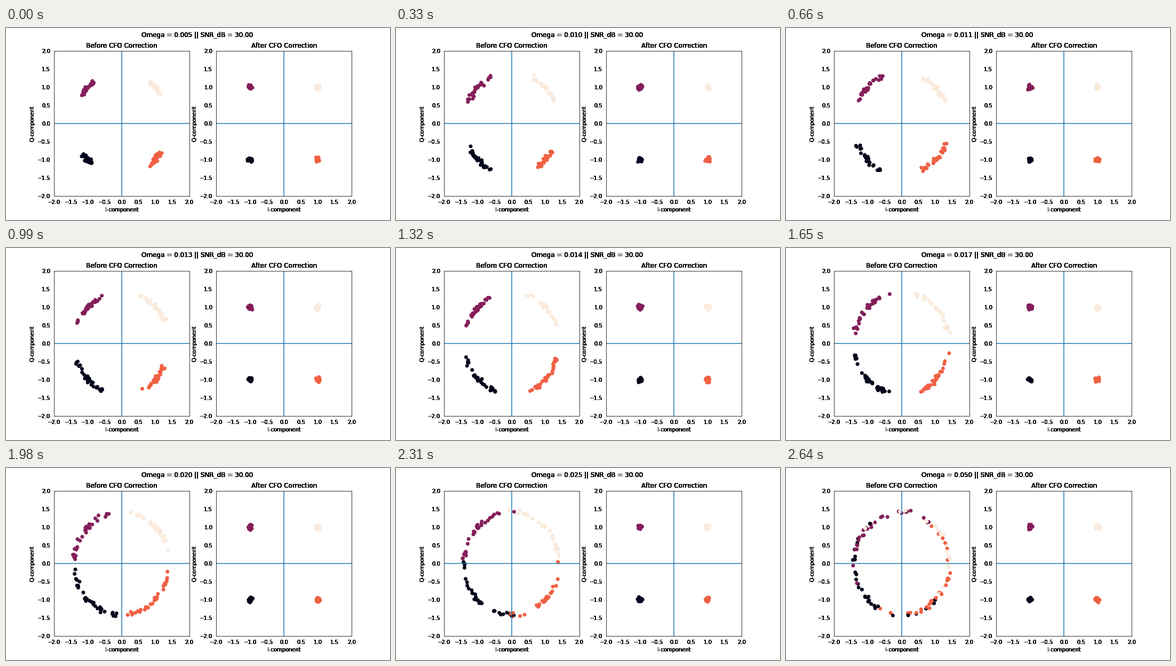
Animation of 720 by 360 pixels, one loop 2970 ms. Source, as a matplotlib script:

```python
import matplotlib.pyplot as plt
import numpy as np
from matplotlib.animation import FuncAnimation

plt.rcParams.update({
    "font.family": "DejaVu Sans",
    "font.size": 10,
    "figure.subplot.bottom": 0.125,
})

SYMBOLS = 120
HALF_LENGTH = 34  # samples on either side of the phase reference
SNR_DB = 30
NOISE = 10 ** (-SNR_DB / 20)
OMEGAS = [0.1 / n for n in (20, 10, 9, 8, 7, 6, 5, 4, 2)]
COLORS = ["#03051a", "#841e5a", "#f06043", "#faebdd"]
QUADRANTS = np.radians([225, 135, 315, 45])
PHASES = np.resize(QUADRANTS, SYMBOLS)


def received(angles, rng):
    ideal = np.sqrt(2) * np.column_stack([np.cos(angles), np.sin(angles)])
    return ideal + np.clip(rng.normal(0, NOISE, ideal.shape), -0.075, 0.075)


def constellations(step):
    """Received points before and after removing the phase drift."""
    rng = np.random.default_rng(step)
    u = rng.uniform(-1, 1, SYMBOLS)
    sample = HALF_LENGTH * np.sign(u) * np.abs(u) ** 1.5
    return received(PHASES + OMEGAS[step] * sample, rng), received(PHASES, rng)


def harden(text):
    """Draw the text repeatedly so its soft edges turn solid."""
    draw = text.draw

    def draw_repeatedly(renderer):
        for _ in range(12):
            draw(renderer)

    text.draw = draw_repeatedly


def setup(ax, title):
    ticks = np.arange(-2, 2.1, 0.5)
    ax.set(xlim=(-2, 2), ylim=(-2, 2), xticks=ticks, yticks=ticks,
           title=title, xlabel="I-component", ylabel="Q-component")
    ax.tick_params(color="none")
    ax.axhline(0)
    ax.axvline(0)
    for text in [ax.title, ax.xaxis.label, ax.yaxis.label,
                 *ax.get_xticklabels(), *ax.get_yticklabels()]:
        harden(text)
    start = np.zeros(SYMBOLS)
    return ax.scatter(start, start, c=np.resize(COLORS, SYMBOLS))


fig, axes = plt.subplots(1, 2, figsize=(10, 5), dpi=72)
heading = fig.suptitle("", x=0.498)
harden(heading)
clouds = [setup(ax, f"{name} CFO Correction")
          for ax, name in zip(axes, ["Before", "After"])]


def update(step):
    heading.set_text(f"Omega = {OMEGAS[step]:.3f} || SNR_dB = {SNR_DB:.2f}")
    for cloud, points in zip(clouds, constellations(step)):
        cloud.set_offsets(points)
    return [heading, *clouds]


anim = FuncAnimation(fig, update, frames=len(OMEGAS), interval=330,
                     repeat=True, repeat_delay=0, blit=False)
plt.show()
```
